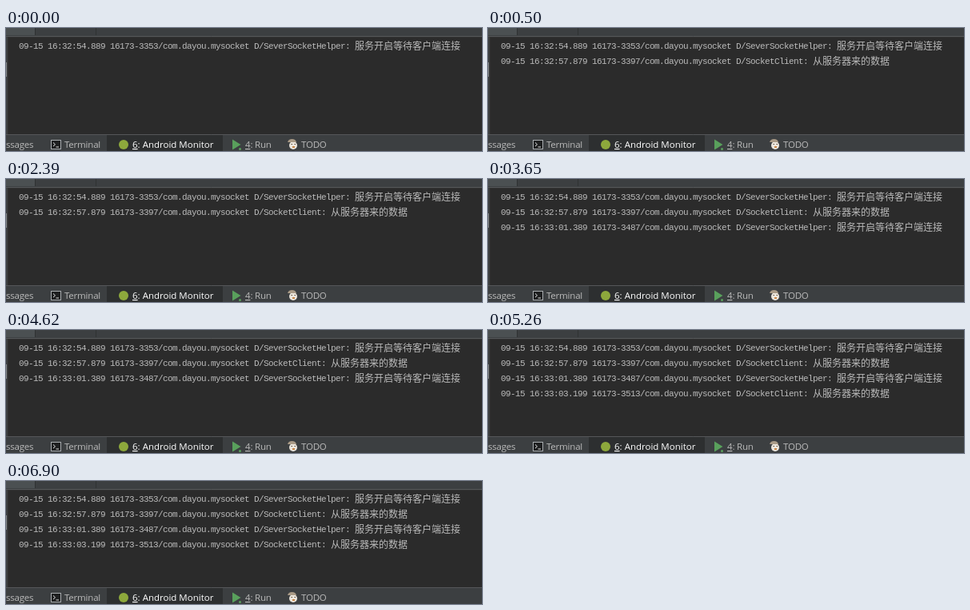
An HTML page for the animation above (8 s loop, 595 by 154 pixels).

```html
<!DOCTYPE html>
<html lang="zh">
<head>
<meta charset="utf-8">
<title>Log output</title>
<style>
  html, body { margin: 0; width: 100%; height: 100%; overflow: hidden; background: #2b2b2b; }
  svg { display: block; }
  text { white-space: pre; }
  #log { font: 11px "Liberation Mono", monospace; letter-spacing: -.6px; fill: #bbb; }
  .message { font: 12px "Noto Sans CJK SC", "Noto Sans CJK", sans-serif; letter-spacing: 0; }
  #tabs { font: 11.5px "Open Sans", sans-serif; letter-spacing: -.2px; fill: #bbb; }
  #tabs .active { letter-spacing: 0; fill: #fff; }
  .key { text-decoration: underline; }
</style>
</head>
<body>
<svg width="595" height="154" viewBox="0 0 595 154">
  <rect width="595" height="154" fill="#3c3f41"/>
  <rect width="36" height="9" fill="#4b5052"/>
  <path d="M36.5 0V9M112.5 0V9" stroke="#2f3233"/>
  <path d="M0 10.5H595" stroke="#555759"/>
  <rect x="3" y="12" width="592" height="121" fill="#2b2b2b"/>
  <path d="M2.5 11V133M2 11.5H595" fill="none" stroke="#323232"/>
  <path d="M.5 43V61" stroke="#85888a"/>
  <path d="M0 133.5H595" stroke="#555759"/>
  <rect x="126" y="134" width="145" height="20" fill="#2d2f30"/>

  <g id="log"></g>

  <g id="tabs">
    <text x="0" y="150">ssages</text>
    <text x="73" y="150">Terminal</text>
    <text x="158" y="150" class="active"><tspan class="key">6</tspan>: Android Monitor</text>
    <text x="299" y="150"><tspan class="key">4</tspan>: Run</text>
    <text x="369" y="150">TODO</text>
  </g>

  <!-- terminal -->
  <rect x="56.5" y="140.5" width="12" height="11" fill="#1e1f20" stroke="#a9adb0"/>
  <path d="M59 143.5l2.5 2.3-2.5 2.3M62.5 149H66" fill="none" stroke="#e4e4e4"/>
  <!-- monitor -->
  <circle cx="147" cy="146" r="6" fill="#8da83c"/>
  <!-- run -->
  <path d="M283 139.5L293.5 146 283 152.5Z" fill="#59a05c"/>
  <circle cx="292.5" cy="151.5" r="1.5" fill="#59a05c"/>
  <!-- to-do -->
  <circle cx="359" cy="147" r="5" fill="#ece6dc"/>
  <path d="M352 143q1-4 5.500-4t5.500 4z" fill="#a99a86"/>
  <path d="M356.500 145.500h1.500M360.500 145.500h1.500" stroke="#594a3b"/>
  <path d="M358 149h3" stroke="#c98747" stroke-width="2"/>
</svg>
<script>
const LOOP = 8000;
const server = ["SeverSocketHelper", "服务开启等待客户端连接"];
const client = ["SocketClient", "从服务器来的数据"];
const entries = [
  [0, "16:32:54.889 16173-3353", server],
  [500, "16:32:57.879 16173-3397", client],
  [3650, "16:33:01.389 16173-3487", server],
  [5260, "16:33:03.199 16173-3513", client],
];

const log = document.getElementById("log");
log.innerHTML = entries.map(([, stamp, [tag, message]], i) =>
  `<text x="16" y="${26 + 19 * i}">09-15 ${stamp}/com.dayou.mysocket D/${tag}: ` +
  `<tspan class="message" dy=".5">${message}</tspan></text>`).join("");

function draw() {
  const time = performance.now() % LOOP;
  entries.forEach(([start], i) => {
    log.children[i].style.visibility = time >= start ? "visible" : "hidden";
  });
  requestAnimationFrame(draw);
}
draw();
</script>
</body>
</html>
```
